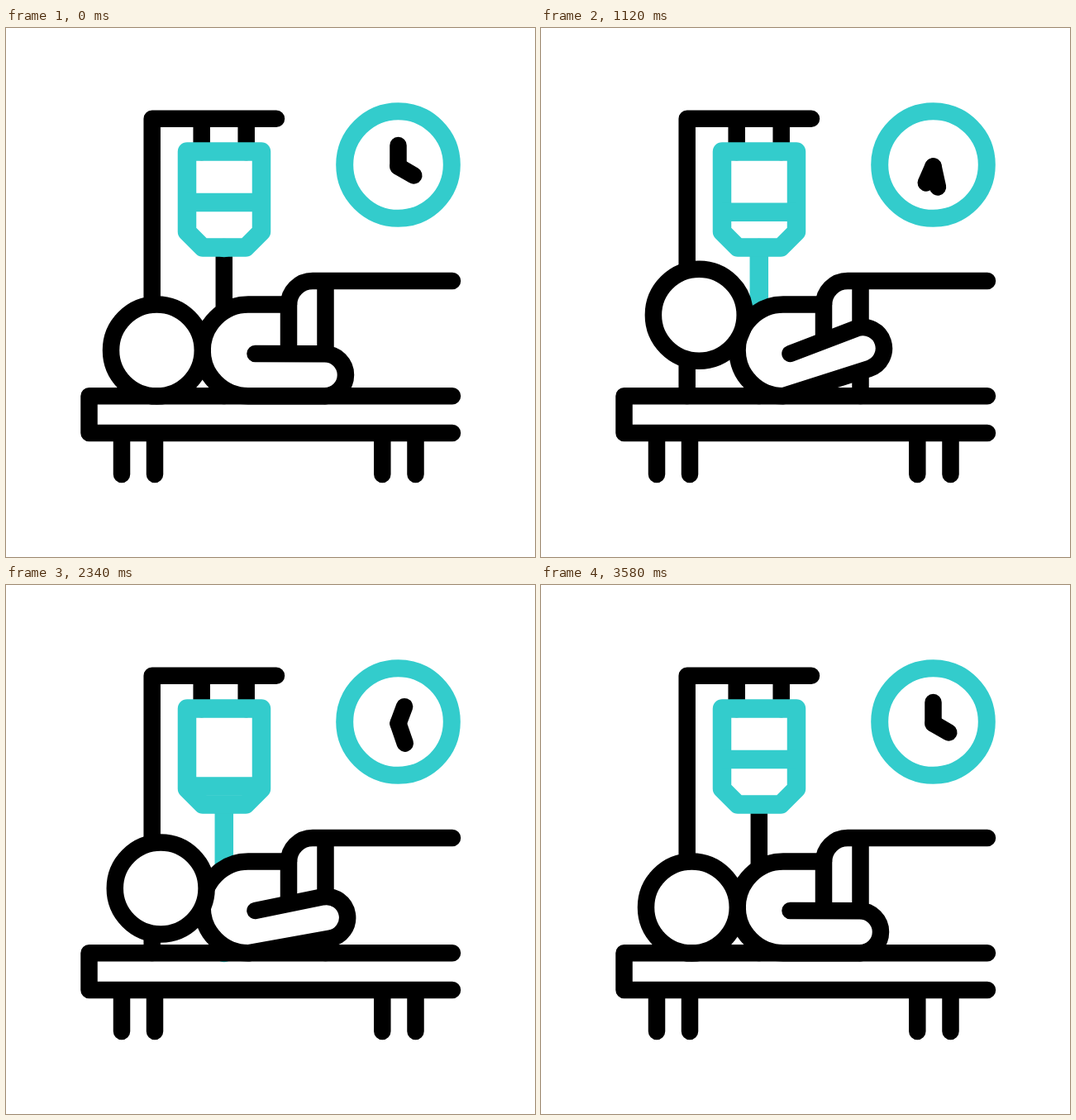
Recreate the animation shown at these times as an HTML page. Size 640 px wide and 640 px high, loop 3.6 s.

```html
<!DOCTYPE html>
<html lang="en">
<head>
<meta charset="utf-8">
<title>Patient on a drip</title>
<style>
  html, body { margin: 0; width: 100%; height: 100%; overflow: hidden; background: #fff; }
  svg { display: block; width: 100%; height: 100%; }
  path, circle { fill: none; stroke: #000; stroke-width: 20.5; stroke-linecap: round; stroke-linejoin: round; }
  .teal { stroke: #3cc; stroke-width: 22.5; }
  .solid { fill: #fff; }
</style>
</head>
<body>
<svg viewBox="0 0 640 640">
  <path d="M176.7 445V109.8H327M236.7 110V150M290.7 110V150M263.8 266V445"/>
  <path id="flow" class="teal"/>
  <path class="teal" d="M219 149.5H309V246.5L290 265.5H238L219 246.5Z"/>
  <path id="level" class="teal" style="stroke-linecap:butt" d="M219 0H309"/>

  <path d="M540 306H371A29 29 0 0 0 342 335V394M386.5 306V445"/>
  <path id="body" class="solid"/>
  <circle id="head" class="solid" cx="182.4" cy="390" r="55.4"/>
  <path d="M540 445.3H100.5V490H540M140 490V540M180 490V540M455.3 490V540M495.5 490V540"/>

  <circle class="teal" style="stroke-width:21" cx="474.5" cy="165.5" r="64.8"/>
  <g transform="translate(474.5 167.5)">
    <path id="minute" d="M0 0V-25.5"/>
    <path id="hour" d="M0 0V-21.7"/>
  </g>
</svg>
<script>
const LOOP = 3600, END = 3580;
const el = id => document.getElementById(id);
const set = (id, name, value) => el(id).setAttribute(name, value);

// Eased progress from 0 to 1 between two times
function ease(t, from, to) {
  const u = Math.min(1, Math.max(0, (t - from) / (to - from)));
  return u * u * (3 - 2 * u);
}

// Torso and bent arm; the elbow rises with lift
function bodyPath(lift) {
  const r = 25.5, angle = lift * Math.PI / 10;
  const x = 385.5 + 4 * lift, y = 419.7 - 32.5 * lift;
  const dx = r * Math.sin(angle), dy = r * Math.cos(angle);
  return `M310 334.5H293A55.4 55.4 0 0 0 293 445.3L${x + dx} ${y + dy}` +
    `A${r} ${r} 0 0 0 ${x - dx} ${y - dy}L301.5 394M310 334.5H342`;
}

function draw(t) {
  const lift = ease(t, 0, 1200) - ease(t, 1200, END);
  set('head', 'transform', `translate(${9 * lift} ${-43.3 * lift})`);
  set('body', 'd', bodyPath(lift));

  const turn = ease(t, 0, END);
  set('minute', 'transform', `rotate(${720 * turn})`);
  set('hour', 'transform', `rotate(${120 + 360 * turn})`);

  const drained = ease(t, 0, 3000) - ease(t, 3000, END);
  set('level', 'transform', `translate(0 ${211 + 37 * drained})`);

  const front = ease(t, 0, 2220), tail = ease(t, 2270, END);
  set('flow', 'd', front > tail ? `M263.8 ${266 + 179 * tail}V${266 + 179 * front}` : '');
}

const start = performance.now();
function tick() {
  draw((performance.now() - start) % LOOP);
  requestAnimationFrame(tick);
}
tick();
</script>
</body>
</html>
```
